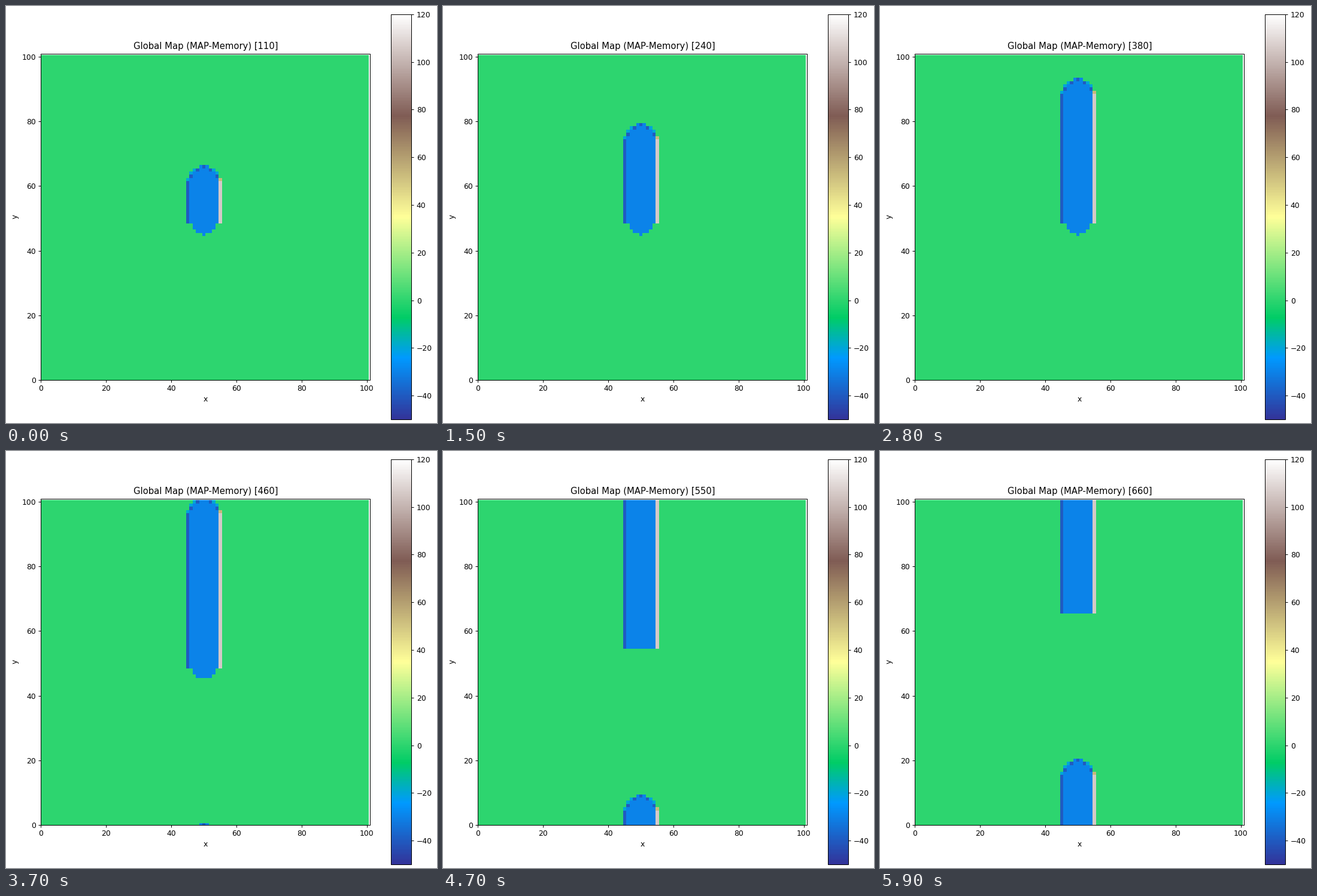
These frames come from a looping animation (720x698 px, 6000 ms). A matplotlib script:

```python
import math
import numpy as np
import matplotlib.pyplot as plt
from matplotlib.animation import FuncAnimation

W, H, DPI = 720, 698, 64
FRAMES, INTERVAL = 60, 100
N, MID, RADIUS = 101, 50, 5    # cells per side, path column, robot radius
START_ROW, MEMORY = 61, 50     # first robot row, rows kept behind it
FLOOR, LEFT, RIGHT = -30, -40, 106
REPEATS = (1, 17, 23, 25, 53)


def px(v):
    """Pixels to points."""
    return v * 72 / DPI


def rect(left, top, right, bottom):
    return [left / W, 1 - bottom / H, (right - left) / W, (bottom - top) / H]


def steps(frame):
    frame -= frame in REPEATS
    return int(np.interp(frame, [1, 15, 28, 37, 59], [0, 13, 27, 35, 55]) + 0.45)


def trail_half(row):
    """Half width of the trail, rounded off where it starts."""
    start = MID - RADIUS
    if row >= MID - 1:
        return RADIUS
    return round(1.8 * math.sqrt(row - start))


def front_height(dx, dy):
    """Height in the robot's round front, fading towards its rim."""
    d2 = dx * dx + dy * dy
    if d2 > RADIUS ** 2 + 1:
        return 0
    if d2 < 20:
        return FLOOR
    if dx == RADIUS:
        return RIGHT / 2
    fade = min(1, abs(dx) / 2) if d2 >= RADIUS ** 2 else 0
    return LEFT * (1 - fade / 2)


def terrain(k):
    """Height map after k steps; rows wrap around the grid."""
    grid = np.zeros((N, N))
    centre = START_ROW + k
    for row in range(max(MID - RADIUS, centre - MEMORY), centre + 1):
        half = trail_half(row)
        line = grid[row % N]
        line[MID - half:MID + half + 1] = FLOOR
        if half == RADIUS:
            line[MID - half], line[MID + half] = LEFT, RIGHT
    for dy in range(1, RADIUS + 1):
        for dx in range(-RADIUS, RADIUS + 1):
            grid[(centre + dy) % N, MID + dx] = front_height(dx, dy)
    return grid


plt.rcParams.update({
    "font.family": "DejaVu Sans", "font.size": px(12.35),
    "axes.titlesize": px(14.8), "axes.titlepad": px(7.4),
    "axes.labelpad": px(4.9), "axes.linewidth": px(1),
})
for axis in ("xtick", "ytick"):
    plt.rcParams.update({f"{axis}.major.size": px(4.3),
                         f"{axis}.major.pad": px(4.3),
                         f"{axis}.major.width": px(1)})

fig = plt.figure(figsize=(W / DPI, H / DPI), dpi=DPI, facecolor="white")
ax = fig.add_axes(rect(58.4, 79.6, 608.4, 625.9))
cax = fig.add_axes(rect(643.3, 13.7, 677.2, 692.2))

edges = np.arange(N + 1) - 0.5
mesh = ax.pcolormesh(edges, edges, terrain(0), cmap="terrain",
                     vmin=-50, vmax=120)
ax.set(xlim=(0, N), ylim=(0, N), xlabel="x", ylabel="y",
       xticks=range(0, N, 20), yticks=range(0, N, 20))
title = ax.set_title("")
fig.colorbar(mesh, cax=cax, ticks=range(-40, 121, 20))


def update(frame):
    k = steps(frame)
    mesh.set_array(terrain(k))
    title.set_text(f"Global Map (MAP-Memory) [{110 + 10 * k}]")
    return mesh, title


anim = FuncAnimation(fig, update, frames=FRAMES, interval=INTERVAL,
                     repeat=True, repeat_delay=0, blit=False)
plt.show()
```
